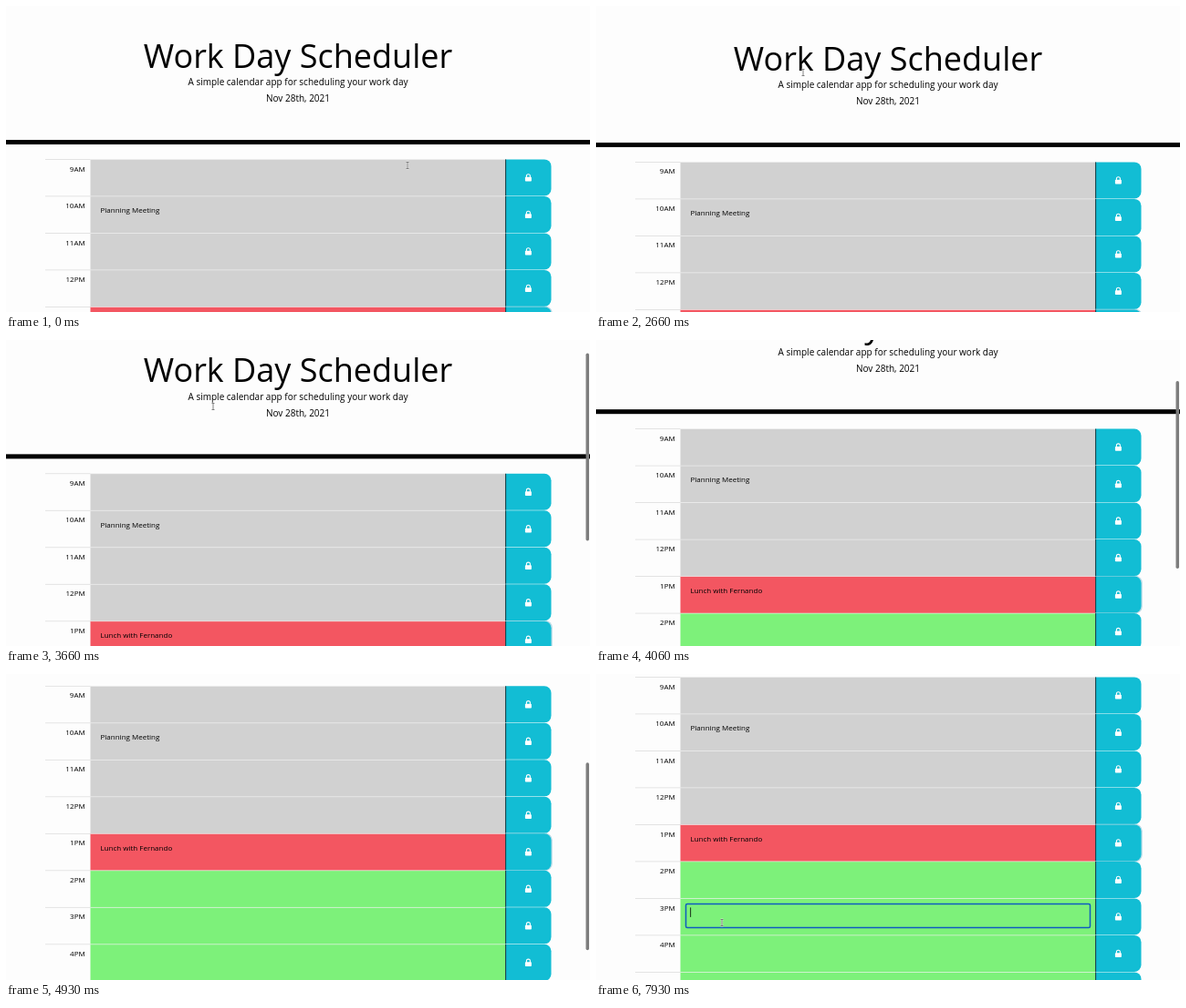
An HTML page with a canvas that plays this animation: 640 px wide and 336 px high, repeating every 8000 ms.

```html
<!DOCTYPE html>
<html lang="en">
<head>
<meta charset="utf-8">
<title>Work Day Scheduler</title>
<style>
  html, body { margin: 0; width: 100%; height: 100%; overflow: hidden; background: #fdfdfd; }
  canvas { display: block; }
</style>
</head>
<body>
<canvas id="stage" width="640" height="336"></canvas>
<script>
const ctx = document.getElementById('stage').getContext('2d');
const LOOP = 8000;
const GRID_TOP = 168.4, ROW = 40.5, LEFT = 92.5, RIGHT = 547.3;
const HOURS = ['9AM', '10AM', '11AM', '12PM', '1PM', '2PM', '3PM', '4PM', '5PM'];
const TASKS = { 1: 'Planning Meeting', 4: 'Lunch with Fernando' };
const NOW = 4, FOCUSED = 6;
const FOCUS_AT = 6870;

// Keyframes: [time, value, ...]
const SCROLL = [
  [1760, 0], [2080, -14], [2340, -8], [2660, -3], [3000, 0],
  [3400, 0], [3660, 21.5], [4400, 112.5], [4930, 155], [5060, 165]
];
const POINTER = [
  [60, 440, 175], [860, 330, 215], [1500, 150, 190], [2000, 227, 73],
  [5700, 227, 73], [6060, 118, 219], [6460, 118, 219], [6900, 138, 267], [7360, 138, 273]
];

function sample(keys, t, channel = 1) {
  const next = keys.findIndex(k => k[0] > t);
  if (next === 0) return keys[0][channel];
  if (next < 0) return keys[keys.length - 1][channel];
  const a = keys[next - 1], b = keys[next];
  return a[channel] + (b[channel] - a[channel]) * (t - a[0]) / (b[0] - a[0]);
}

function rect(x, y, w, h, color) {
  ctx.fillStyle = color;
  ctx.fillRect(x, y, w, h);
}

function roundRect(x, y, w, h, radii, color) {
  ctx.beginPath();
  ctx.roundRect(x, y, w, h, radii);
  ctx.fillStyle = color;
  ctx.fill();
}

function text(str, x, y, size, align) {
  ctx.font = `${size}px "Open Sans", sans-serif`;
  ctx.textAlign = align;
  ctx.fillStyle = '#000';
  ctx.fillText(str, x, y);
}

function drawHeader() {
  text('Work Day Scheduler', 320, 68, 36, 'center');
  text('A simple calendar app for scheduling your work day', 320, 87.4, 10, 'center');
  text('Nov 28th, 2021', 320, 105.4, 10, 'center');
  rect(0, 147, 640, 5, '#000');
}

function drawLock(x, y) {
  roundRect(x - 3.5, y - 0.8, 7, 4.8, 0.8, '#fff');
  ctx.beginPath();
  ctx.moveTo(x - 2, y);
  ctx.lineTo(x - 2, y - 1.9);
  ctx.arc(x, y - 1.9, 2, Math.PI, 0);
  ctx.lineTo(x + 2, y);
  ctx.lineWidth = 1.1;
  ctx.strokeStyle = '#fff';
  ctx.stroke();
}

function drawRow(hour, i) {
  const y = GRID_TOP + i * ROW;
  const color = i < NOW ? '#d1d1d1' : i === NOW ? '#f35661' : '#7df17a';
  rect(43, y - 0.4, LEFT - 43, 0.8, '#dedede');
  rect(LEFT, y, RIGHT - LEFT, ROW, color);
  rect(LEFT, y - 0.4, RIGHT - LEFT, 0.8, 'rgba(240,240,240,.75)');
  text(hour, 86.7, y + 13.1, 8, 'right');
  if (TASKS[i]) text(TASKS[i], 103.5, y + 18.3, 8, 'left');

  const corners = [0, 7.5, 7.5, 0];
  if (i === NOW) roundRect(RIGHT, y - 0.6, 51.4, ROW + 0.8, corners, '#b4d9e6');
  roundRect(RIGHT, y, 50.2, ROW - 0.5, corners, '#12bdd4');
  rect(RIGHT, y, 0.8, ROW - 0.5, '#111');
  drawLock(572.4, y + 20.2);
}

function drawFocus(t) {
  const y = GRID_TOP + FOCUSED * ROW;
  ctx.beginPath();
  ctx.roundRect(98.5, y + 6, 443, 26, 1.5);
  ctx.lineWidth = 1.5;
  ctx.strokeStyle = '#0f5cc0';
  ctx.stroke();
  const caretOn = Math.floor((t - FOCUS_AT) / 515) % 2 === 0;
  if (caretOn) rect(103.3, y + 10, 0.8, 10.5, '#000');
}

function drawPointer(x, y) {
  ctx.beginPath();
  ctx.moveTo(x - 1.5, y - 3.5);
  ctx.lineTo(x + 1.5, y - 3.5);
  ctx.moveTo(x, y - 3.5);
  ctx.lineTo(x, y + 3.5);
  ctx.moveTo(x - 1.5, y + 3.5);
  ctx.lineTo(x + 1.5, y + 3.5);
  for (const [width, color] of [[2.2, 'rgba(255,255,255,.6)'], [0.8, '#666']]) {
    ctx.lineWidth = width;
    ctx.strokeStyle = color;
    ctx.stroke();
  }
}

function drawScrollbar(scroll, t) {
  ctx.globalAlpha = Math.min(1, Math.max(0, (5780 - t) / 250));
  roundRect(635.5, 1 + scroll * 0.62, 3.5, 206, 1.75, '#7d7d7d');
  ctx.globalAlpha = 1;
}

function draw(t) {
  const scroll = sample(SCROLL, t);
  rect(0, 0, 640, 336, '#fdfdfd');
  ctx.save();
  ctx.translate(0, -scroll);
  drawHeader();
  HOURS.forEach(drawRow);
  if (t >= FOCUS_AT) drawFocus(t);
  ctx.restore();
  if (t >= 3400 && t < 5780) drawScrollbar(scroll, t);
  if (t < 3900 || t > 5700) drawPointer(sample(POINTER, t, 1), sample(POINTER, t, 2));
}

function tick() {
  draw(performance.now() % LOOP);
  requestAnimationFrame(tick);
}
tick();
</script>
</body>
</html>
```
